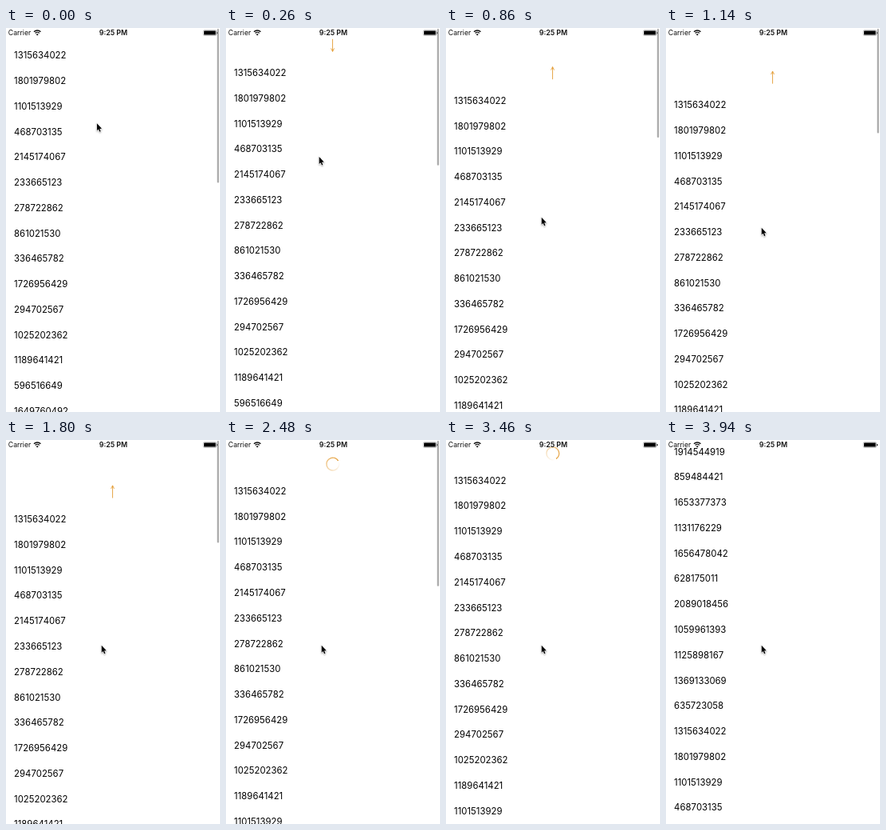
Recreate the animation shown at these times as an HTML page with a canvas. Size 268 px wide and 480 px high, loop 4080 ms.

```html
<!DOCTYPE html>
<html lang="en">
<head>
<meta charset="utf-8">
<title>Pull to refresh</title>
<style>
html, body { margin: 0; width: 100%; height: 100%; overflow: hidden; background: #fff; }
canvas { display: block; width: 268px; height: 480px; }
</style>
</head>
<body>
<canvas id="stage"></canvas>
<script>
const W = 268, H = 480, LOOP = 4080, STEP = 20;
const RELEASE = 2280, SETTLED = 2820, RELOAD = 3460, END = 3940;
const REST = 16.5, FINAL = -19.6, PITCH = 31.77, FIRST_ROW = 34;
const FONT = 'Inter, Roboto, sans-serif';
const ORANGE = '#e39a30';

const before = ['1315634022', '1801979802', '1101513929', '468703135', '2145174067',
  '233665123', '278722862', '861021530', '336465782', '1726956429', '294702567',
  '1025202362', '1189641421', '596516649', '1649760492'];
const during = [...before.slice(0, 13), '1101513929'];
const after = ['1914544919', '859484421', '1653377373', '1131176229', '1656478042',
  '628175011', '2089018456', '1059961393', '1125898167', '1369133069', '635723058',
  ...before.slice(0, 4)];

// Finger travel: time, distance, speed
const drag = [[0, 0, 0.12], [540, 88, 0.125], [860, 117.5, 0.064], [1080, 128, 0.038], [1380, 137.5, 0]];

const canvas = document.getElementById('stage');
const ctx = canvas.getContext('2d');
const dpr = window.devicePixelRatio || 1;
canvas.width = W * dpr;
canvas.height = H * dpr;

const clamp = v => Math.min(1, Math.max(0, v));
const mix = (a, b, k) => a + (b - a) * k;
const span = (t, a, b) => clamp((t - a) / (b - a));
const easeInOut = k => k * k * (3 - 2 * k);
const rubber = d => H * (1 - 1 / (d * 0.546 / H + 1));

function travel(t) {
  for (let i = 1; i < drag.length; i++) {
    const [t0, y0, v0] = drag[i - 1], [t1, y1, v1] = drag[i];
    if (t > t1) continue;
    const d = t1 - t0, k = (t - t0) / d, k2 = k * k, k3 = k2 * k;
    return (2 * k3 - 3 * k2 + 1) * y0 + (k3 - 2 * k2 + k) * d * v0 +
      (3 * k2 - 2 * k3) * y1 + (k3 - k2) * d * v1;
  }
  return drag[drag.length - 1][1];
}

function offsetAt(t) {
  if (t > RELOAD) return mix(REST, FINAL, easeInOut(span(t, RELOAD, END)));
  const pulled = rubber(travel(t));
  if (t <= RELEASE) return pulled;
  return mix(REST, pulled, Math.pow(1 - span(t, RELEASE, SETTLED), 2.8));
}

function label(text, x, y, size, weight, align = 'left') {
  ctx.font = `${weight} ${size}px ${FONT}`;
  ctx.textAlign = align;
  ctx.textBaseline = 'alphabetic';
  ctx.fillText(text, x, y);
}

function drawRows(t, off) {
  const rows = t <= RELEASE ? before : t <= RELOAD ? during : after;
  ctx.fillStyle = '#000';
  ctx.fontKerning = 'none';
  rows.forEach((text, i) => label(text, 10.1, FIRST_ROW + off + i * PITCH + 4.2, 11.35, 400));
  ctx.fontKerning = 'auto';
}

function drawArrow(t, off) {
  ctx.save();
  ctx.translate(133.5, off - 0.2);
  ctx.rotate(Math.PI * easeInOut(span(t, 600, 840)));
  ctx.strokeStyle = ORANGE;
  ctx.lineWidth = 0.85;
  ctx.beginPath();
  ctx.moveTo(0, -7.8);
  ctx.lineTo(0, 7.8);
  ctx.moveTo(-2, 3.8);
  ctx.lineTo(0, 7.8);
  ctx.lineTo(2, 3.8);
  ctx.stroke();
  ctx.restore();
}

function drawSpinner(t, off) {
  const fade = ctx.createConicGradient(0, 0, 0);
  fade.addColorStop(0, 'rgba(227,154,48,0)');
  fade.addColorStop(0.15, 'rgba(227,154,48,0.1)');
  fade.addColorStop(1, ORANGE);
  ctx.save();
  ctx.translate(133.7, off + 0.3);
  ctx.rotate((330 + (t - 2480) * 0.459) * Math.PI / 180);
  ctx.strokeStyle = fade;
  ctx.lineWidth = 1.4;
  ctx.beginPath();
  ctx.arc(0, 0, 7.9, 0.2, Math.PI * 2);
  ctx.stroke();
  ctx.restore();
}

function drawScrollbar(t, off) {
  const alpha = 1 - span(t, 2560, SETTLED);
  if (!alpha) return;
  const over = t <= RELEASE ? off : Math.max(0, off - 19);
  ctx.globalAlpha = alpha;
  ctx.fillStyle = '#a2a2a2';
  ctx.beginPath();
  ctx.roundRect(264.5, 1, 2.1, 192.5 - over, 1);
  ctx.fill();
  ctx.globalAlpha = 1;
}

function drawBattery() {
  ctx.strokeStyle = '#777';
  ctx.lineWidth = 0.5;
  ctx.beginPath();
  ctx.roundRect(247.2, 2.8, 16.2, 6.5, 1.2);
  ctx.stroke();
  ctx.fillStyle = '#000';
  ctx.beginPath();
  ctx.roundRect(248, 3.6, 14.6, 4.9, 0.6);
  ctx.roundRect(264, 4.9, 1, 2.4, 0.5);
  ctx.fill();
}

function drawStatus() {
  ctx.fillStyle = '#111';
  label('Carrier', 2.8, 9.1, 8.7, 400);
  label('9:25 PM', 134.4, 9.1, 8.8, 600, 'center');

  ctx.strokeStyle = '#111';
  ctx.lineWidth = 1.3;
  for (const r of [3.6, 6]) {
    ctx.beginPath();
    ctx.arc(39.2, 9, r, -Math.PI * 0.75, -Math.PI * 0.25);
    ctx.stroke();
  }
  ctx.beginPath();
  ctx.moveTo(39.2, 9.4);
  ctx.arc(39.2, 9.4, 2.1, -Math.PI * 0.75, -Math.PI * 0.25);
  ctx.fill();
  drawBattery();
}

function drawCursor(t) {
  const shape = [[0, 0], [0, 10.2], [2.2, 8.2], [3.8, 12], [5.4, 11.3], [3.8, 7.6], [6.9, 7.4]];
  ctx.save();
  ctx.translate(mix(113.9, 119.7, easeInOut(span(t, 0, 540))), 119.2 + travel(t));
  ctx.scale(0.88, 0.88);
  ctx.beginPath();
  shape.forEach(([x, y]) => ctx.lineTo(x, y));
  ctx.closePath();
  ctx.shadowColor = 'rgba(0,0,0,0.35)';
  ctx.shadowBlur = 2 * dpr;
  ctx.shadowOffsetY = dpr;
  ctx.strokeStyle = '#fff';
  ctx.lineWidth = 1.2;
  ctx.stroke();
  ctx.shadowColor = 'transparent';
  ctx.fillStyle = '#000';
  ctx.fill();
  ctx.restore();
}

function draw(t) {
  const off = offsetAt(t);
  ctx.setTransform(dpr, 0, 0, dpr, 0, 0);
  ctx.fillStyle = '#fff';
  ctx.fillRect(0, 0, W, H);
  drawRows(t, off);
  if (t > RELEASE) drawSpinner(t, off);
  else if (off > 0) drawArrow(t, off);
  drawStatus();
  drawScrollbar(t, off);
  drawCursor(t);
}

const start = performance.now();
function tick() {
  const t = (performance.now() - start) % LOOP;
  draw(Math.floor(t / STEP) * STEP);
  requestAnimationFrame(tick);
}
tick();
</script>
</body>
</html>
```
